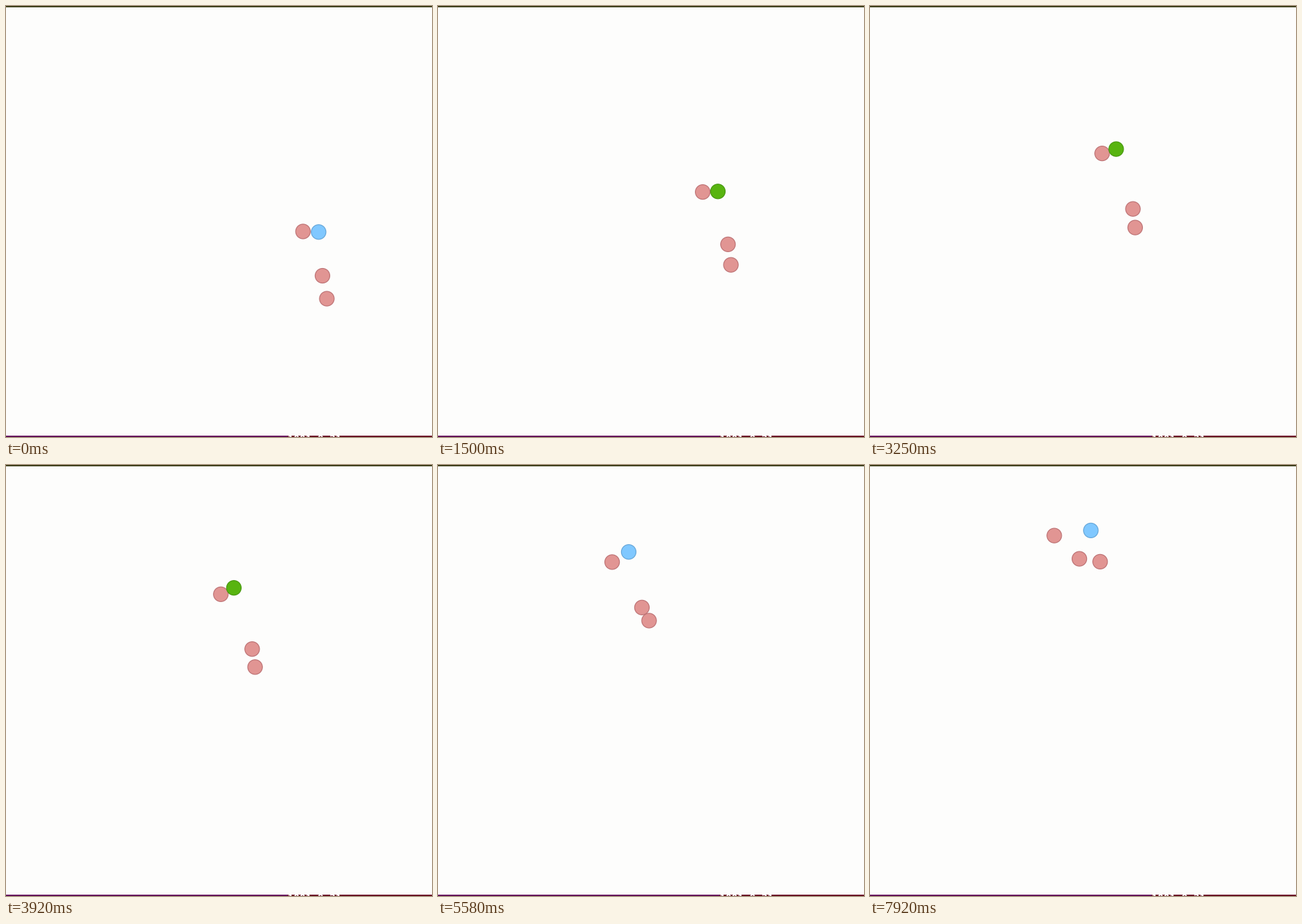
Write a matplotlib script that moves like this. It is 640x648 px and loops after 8000 ms.

```python
import numpy as np
import matplotlib.pyplot as plt
from matplotlib.animation import FuncAnimation
from matplotlib.patches import Circle, Rectangle

W, H, DPI = 640, 648, 100
LOOP, STEP = 8000, 20
RELEASE, END = 4.67, 7.92  # seconds: the pinch starts to open, is fully open
TOUCH = 23                 # dots closer than this count as touching

# The leading dot's way: seconds, x, y
KEYS = np.array([(0, 469.7, 339.8), (1.5, 420.5, 278.8), (3.25, 369.5, 214.7),
                 (4.67, 312.5, 153.8), (5.58, 286.5, 130.7),
                 (6.5, 295.3, 111.2), (7.92, 331.8, 98.4)])
TIMES, PATH = KEYS[:, 0], KEYS[:, 1:]
SLOPES = np.gradient(PATH, TIMES, axis=0)

PINK, PINK_EDGE = "#e19593", "#bd7274"
BLUE, BLUE_EDGE = "#80c8ff", "#66a6d8"
GREEN, GREEN_EDGE = "#58b410", "#489810"


def lead_at(t):
    """Smooth Hermite curve through the key points."""
    i = np.clip(np.searchsorted(TIMES, t, side="right") - 1, 0, len(TIMES) - 2)
    span = TIMES[i + 1] - TIMES[i]
    u = (t - TIMES[i]) / span
    return ((1 + 2 * u) * (1 - u) ** 2 * PATH[i]
            + u * (1 - u) ** 2 * span * SLOPES[i]
            + u * u * (3 - 2 * u) * PATH[i + 1]
            + u * u * (u - 1) * span * SLOPES[i + 1])


def smooth(u):
    u = np.clip(u, 0, 1)
    return u * u * (3 - 2 * u)


def polar(length, degrees):
    """Offset at an angle turned from straight down towards the right."""
    a = np.radians(degrees)
    return length * np.array([np.sin(a), np.cos(a)])


def pose(t):
    """Left, middle, low and leading dot: the hand grips, then opens."""
    grip = np.clip(t / RELEASE, 0, 1)
    rise = np.sin(np.pi / 2 * grip)
    q = np.clip((t - RELEASE) / (END - RELEASE), 0, 1)
    fold, spread = q ** 1.2, smooth(1.1 * q)
    lead = lead_at(t)
    left = polar(23.5 - 2 * grip + 34 * spread,
                 -92 + 40 * grip ** 2 - 30 * fold)
    mid = polar(66 + 31 * rise - 51 * fold,
                5 + 12 * rise - 39 * spread ** 1.6)
    low = polar(101 + 23 * rise - 75 * fold, 7 + 9.5 * grip)
    return lead + left, lead + mid, lead + low, lead


fig = plt.figure(figsize=(W / DPI, H / DPI), dpi=DPI, facecolor="#fdfdfc")
ax = fig.add_axes([0, 0, 1, 1])
ax.set_xlim(0, W)
ax.set_ylim(H, 0)
ax.axis("off")


def bar(x, y, w, h, color):
    ax.add_patch(Rectangle((x, y), w, h, fc=color, lw=0))


bar(0, 0, W, 1.5, "#40401c")
bar(0, 646, 423, 2, "#640a5a")
bar(423, 646, W - 423, 2, "#6a0a24")
ax.text(423, 657, "1001 8:31", color="white", family="DejaVu Sans Mono",
        weight="bold", size=15 * 72 / DPI, va="baseline", clip_on=True)

dots = [ax.add_patch(Circle((0, 0), 11, lw=1.2 * 72 / DPI, zorder=3 + k,
                            fc=PINK, ec=PINK_EDGE))
        for k in range(4)]


def draw(n):
    spots = pose(n * STEP / 1000)
    for dot, spot in zip(dots, spots):
        dot.center = tuple(spot)
    touching = np.hypot(*(spots[3] - spots[0])) < TOUCH
    dots[3].set_facecolor(GREEN if touching else BLUE)
    dots[3].set_edgecolor(GREEN_EDGE if touching else BLUE_EDGE)
    return dots


anim = FuncAnimation(fig, draw, frames=LOOP // STEP, interval=STEP,
                     repeat=True, repeat_delay=0, blit=False)
plt.show()
```
